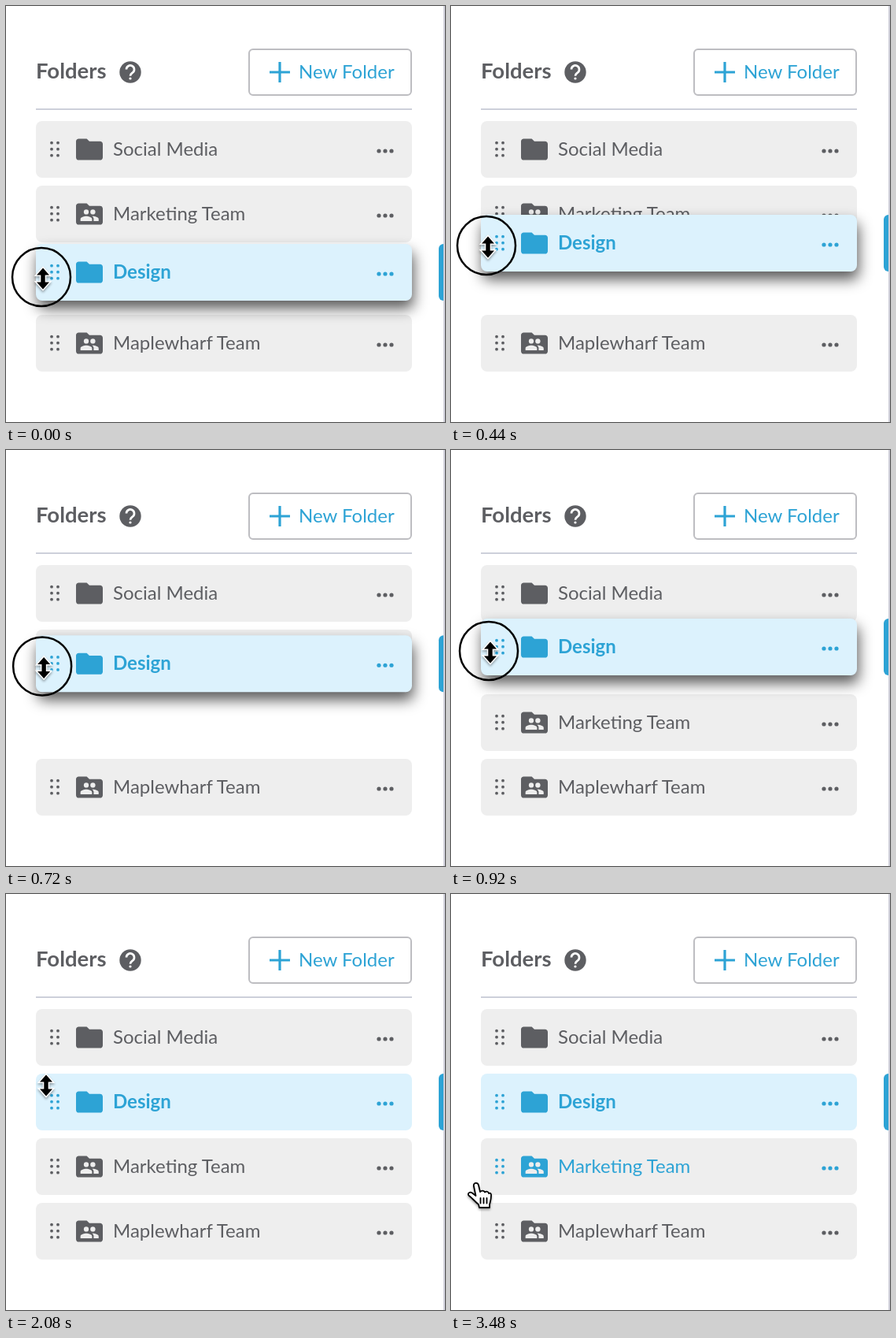
An HTML page that plays this animation: 558 px wide and 528 px high, repeating every 3520 ms.

```html
<!DOCTYPE html>
<html lang="en">
<head>
<meta charset="utf-8">
<title>Folder reordering</title>
<style>
  html, body { margin: 0; width: 100%; height: 100%; overflow: hidden; background: #fff; }
  svg { display: block; font: 24px Lato, sans-serif; }
  .ink { color: #5d5e62; }
  .blue { color: #2da3d5; }
  .bold { font-weight: 700; }
  text, .fill { fill: currentColor; }
  #shadow { filter: blur(9px); }
  #cursor { filter: drop-shadow(0 2px 1.5px rgba(0, 0, 0, .35)); }
</style>
</head>
<body>
<svg width="558" height="528" viewBox="0 0 558 528">
  <defs>
    <clipPath id="line"><rect x="130" y="18" width="320" height="30"/></clipPath>
    <path id="folder" transform="translate(85.6 15.6) scale(1.7)" d="M10 4H4c-1.1 0-2 .9-2 2v12c0 1.1.9 2 2 2h16c1.1 0 2-.9 2-2V8c0-1.1-.9-2-2-2h-8z"/>
    <g id="people" transform="translate(93.6 25) scale(1.05)">
      <circle cx="8" cy="8" r="3"/><circle cx="16" cy="8" r="3"/>
      <path d="M8 13c-2.3 0-7 1.2-7 3.5V19h14v-2.5C15 14.200 10.300 13 8 13zm8 0l-1 .05c1.200.85 2 2 2 3.450V19h6v-2.500C23 14.200 18.300 13 16 13z"/>
    </g>
  </defs>

  <g class="ink">
    <text class="bold" x="38" y="92" font-size="27.5">Folders</text>
    <circle class="fill" cx="158" cy="84" r="13.700"/>
    <path d="M153 80.500a5 5 0 1 1 8 4c-2 1.500-3 2-3 4.300" fill="none" stroke="#fff" stroke-width="2.700"/>
    <circle cx="158" cy="92" r="1.600" fill="#fff"/>
  </g>
  <g class="blue">
    <rect x="309" y="55" width="206" height="58" rx="5" fill="#fff" stroke="#bdbdc1" stroke-width="2"/>
    <path d="M335 84h26M348 71v26" stroke="currentColor" stroke-width="3.200"/>
    <text x="372" y="92">New Folder</text>
  </g>
  <path d="M38 131h478" stroke="#cdd0da" stroke-width="2"/>

  <g id="rows"></g>
  <path d="M557 0v528" stroke="#cfcfd9" stroke-width="2"/>

  <g id="cursor">
    <path id="resize" d="M0-13.500L8-4.500H2.700V4.500H8L0 13.500-8 4.500h5.300V-4.500H-8z" stroke="#fff" stroke-width="3" paint-order="stroke"/>
    <g id="hand" stroke="#000" stroke-width="1.800" stroke-linejoin="round" stroke-linecap="round">
      <path fill="#fff" d="M-3 4C-4-1 2-1.500 3 2.500L5 11C7 9 10 9 11 11.500 13 10 15.500 10.500 16 13 18 12 19.300 13.500 19 16 19 21 18 23 17 27V31H4L3 27C-1 24-5 19-9 16-12 13-8 10.500-5 12.500L-.5 16z"/>
      <path fill="none" d="M5.500 19v6.500M9.500 19v6.500M13.500 19v6.500"/>
    </g>
  </g>
  <circle id="ring" r="37" fill="none" stroke="#000" stroke-width="2.500"/>
</svg>

<script>
const LOOP = 3520, STEP = 40;
const SLOTS = [146, 228, 310, 392];
const DROP = 1440;
const SWAP = 800;
const $ = id => document.getElementById(id);

function row(id, label, { shared, selected } = {}) {
  const dots = [58, 66].flatMap(x => [28, 36, 44].map(y =>
    `<circle cx="${x}" cy="${y - .3}" r="1.900"/>`)).join('');
  const more = [474, 482, 490].map(x => `<circle cx="${x}" cy="38" r="2.600"/>`).join('');
  const back = selected ? '#dcf2fd' : '#eeeeee';
  return `<g id="${id}" class="${selected ? 'blue bold' : 'ink'}">
    ${selected ? `<rect id="shadow" x="40" y="10" width="478" height="72" rx="8" fill-opacity=".65"/>
    <rect class="fill" x="550" width="16" height="72" rx="6"/>` : ''}
    <rect x="38" width="478" height="72" rx="8" fill="${back}"/>
    <g class="fill">${dots}${more}<use href="#folder"/></g>
    ${shared ? `<use href="#people" fill="${back}"/>` : ''}
    <g clip-path="url(#line)"><text x="136" y="44">${label}</text></g>
  </g>`;
}

$('rows').innerHTML =
  row('social', 'Social Media') +
  row('marketing', 'Marketing Team', { shared: true }) +
  row('maple', 'Maplewharf Team', { shared: true }) +
  row('design', 'Design', { selected: true });

// Each key: time, then the animated values
const dragKeys = [[0, 302], [280, 282], [600, 248], [920, 214], [1200, 198]];
const pointerKeys = [
  [0, 47, 346], [280, 47, 324], [600, 47, 288], [920, 50, 257], [1200, 51, 243],
  [2760, 51, 243], [2920, 48, 275], [3080, 40, 340], [3240, 33, 366],
  [3320, 33, 366], [3480, 32, 367]
];

function track(keys, t) {
  const next = keys.findIndex(k => k[0] > t);
  if (next < 0) return keys[keys.length - 1].slice(1);
  const a = keys[next - 1], b = keys[next];
  const p = (t - a[0]) / (b[0] - a[0]);
  return a.slice(1).map((v, i) => v + (b[i + 1] - v) * p);
}

const move = (id, x, y) => $(id).setAttribute('transform', `translate(${x} ${y})`);
const show = (id, on) => $(id).style.display = on ? '' : 'none';

function draw(t) {
  const dragging = t < DROP;
  const [x, y] = track(pointerKeys, t);

  move('social', 0, SLOTS[0]);
  move('marketing', 0, SLOTS[t < SWAP ? 1 : 2]);
  move('maple', 0, SLOTS[3]);
  move('design', 0, dragging ? track(dragKeys, t)[0] : SLOTS[1]);
  show('shadow', dragging);
  $('marketing').setAttribute('class', !dragging && y > SLOTS[2] ? 'blue' : 'ink');

  const pointing = !dragging && y > 300;
  move('cursor', x, y);
  show('resize', !pointing);
  show('hand', pointing);
  move('ring', x - 2, y - 2);
  $('ring').style.opacity = dragging ? 1 : Math.max(0, (1520 - t) / 120);
}

const start = performance.now();
function frame() {
  const t = (performance.now() - start) % LOOP;
  draw(Math.floor(t / STEP) * STEP);
  requestAnimationFrame(frame);
}
frame();
</script>
</body>
</html>
```
